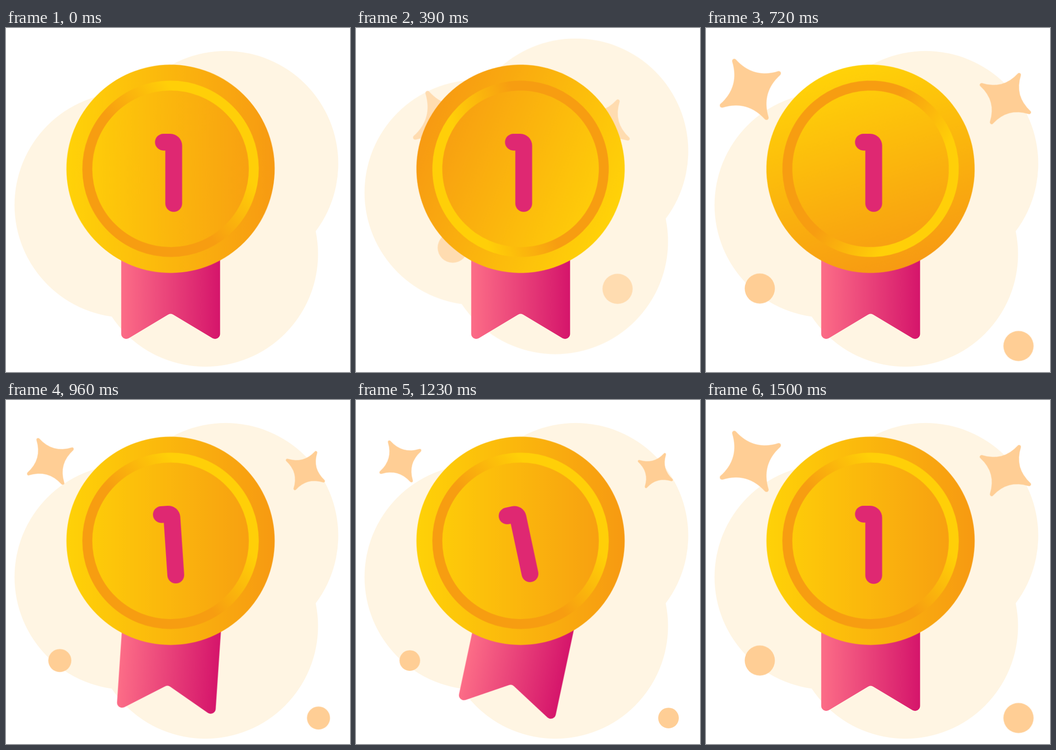
Recreate the animation shown at these times as an HTML page without scripts. Size 748 by 748 pixels, loop 2.7 s.

```html
<!DOCTYPE html>
<html lang="en">
<head>
<meta charset="utf-8">
<title>First place medal</title>
<style>
  html, body { margin: 0; width: 100%; height: 100%; overflow: hidden; background: #fff; }
  svg { display: block; width: 100%; height: 100%; }

  .blob, .fly, .pulse, .spin, .tilt { animation: 2700ms linear infinite; }
  .blob { animation-name: blob; fill: #fff5e3; }
  .fly { animation-name: fly; fill: #ffce95; }
  .pulse { animation-name: pulse; }
  .spin { animation-name: spin; }
  .tilt { animation-name: tilt; }

  @keyframes blob {
    0%, 22.667%, 100% { transform: translateY(0); }
    11.296% { transform: translateY(-38px); }
  }
  /* Decorations burst out from behind the medal */
  @keyframes fly {
    0% { transform: translate(var(--x), var(--y)); opacity: 0; }
    22.222%, 100% { transform: translate(0, 0); opacity: 1; }
  }
  @keyframes pulse {
    0%, 28.148%, 55.556%, 100% { transform: scale(1); }
    41.852% { transform: scale(.565); }
  }
  @keyframes spin {
    0% { transform: rotate(0deg); }
    33.333%, 100% { transform: rotate(-360deg); }
  }
  @keyframes tilt {
    0%, 32.963%, 55.556%, 100% { transform: rotate(0deg); }
    43.148% { transform: rotate(var(--a)); }
  }
</style>
</head>
<body>
<svg viewBox="0 0 748 748">
  <defs>
    <linearGradient id="gold">
      <stop offset="0" stop-color="#ffd208"/>
      <stop offset="1" stop-color="#f79a12"/>
    </linearGradient>
    <linearGradient id="rim" gradientUnits="userSpaceOnUse" x1="-192" x2="192" y1="0" y2="0" gradientTransform="rotate(-40)">
      <stop offset=".42" stop-color="#f79d11"/>
      <stop offset=".8" stop-color="#ffcf08"/>
    </linearGradient>
    <linearGradient id="pink">
      <stop offset="0" stop-color="#fc6d87"/>
      <stop offset="1" stop-color="#d5156b"/>
    </linearGradient>
    <path id="star" d="M71 0Q13 13 0 71Q-13 13 -71 0Q-13 -13 0 -71Q13 -13 71 0Z"
          stroke="#ffce95" stroke-width="9.5" stroke-linejoin="round"/>
    <circle id="dot" r="32.8"/>
  </defs>

  <g class="blob">
    <circle cx="477.5" cy="295" r="245"/>
    <circle cx="263.5" cy="385" r="245"/>
    <circle cx="433.5" cy="491.5" r="245"/>
  </g>

  <g class="fly" style="--x:270px;--y:200px">
    <g transform="translate(96.5 133.5)"><g class="pulse"><use href="#star" transform="rotate(-29.5)"/></g></g>
  </g>
  <g class="fly" style="--x:-320px;--y:165px">
    <g transform="translate(651 153.5)"><g class="pulse"><use href="#star" transform="rotate(30) scale(.84)"/></g></g>
  </g>
  <g class="fly" style="--x:268px;--y:-255px">
    <g transform="translate(117 566.5)"><g class="pulse"><use href="#dot"/></g></g>
  </g>
  <g class="fly" style="--x:-318px;--y:-357px">
    <g transform="translate(679.5 691.5)"><g class="pulse"><use href="#dot"/></g></g>
  </g>

  <g transform="translate(358 527)">
    <path class="tilt" style="--a:15deg" fill="url(#pink)"
          d="M-107.5 -149V138C-107.5 146.5 -98.5 151.5 -91 147.5L-6 96.5Q0 92.5 6 96.5L91 147.5C98.5 151.5 107.5 146.5 107.5 138V-149Z"/>
  </g>

  <g transform="translate(357.8 306.2)">
    <g class="spin">
      <circle r="226.4" fill="url(#gold)"/>
      <circle r="181" fill="none" stroke="url(#rim)" stroke-width="21.6"/>
    </g>
  </g>

  <g transform="translate(353.5 315)">
    <path class="tilt" style="--a:-15deg" fill="#df2872"
          d="M-11.3 -85H3.5A26 26 0 0 1 29.5 -59V66.5A18.3 18.3 0 0 1 -7.1 66.5V-48.6H-11.3A18.2 18.2 0 0 1 -11.3 -85Z"/>
  </g>
</svg>
</body>
</html>
```
